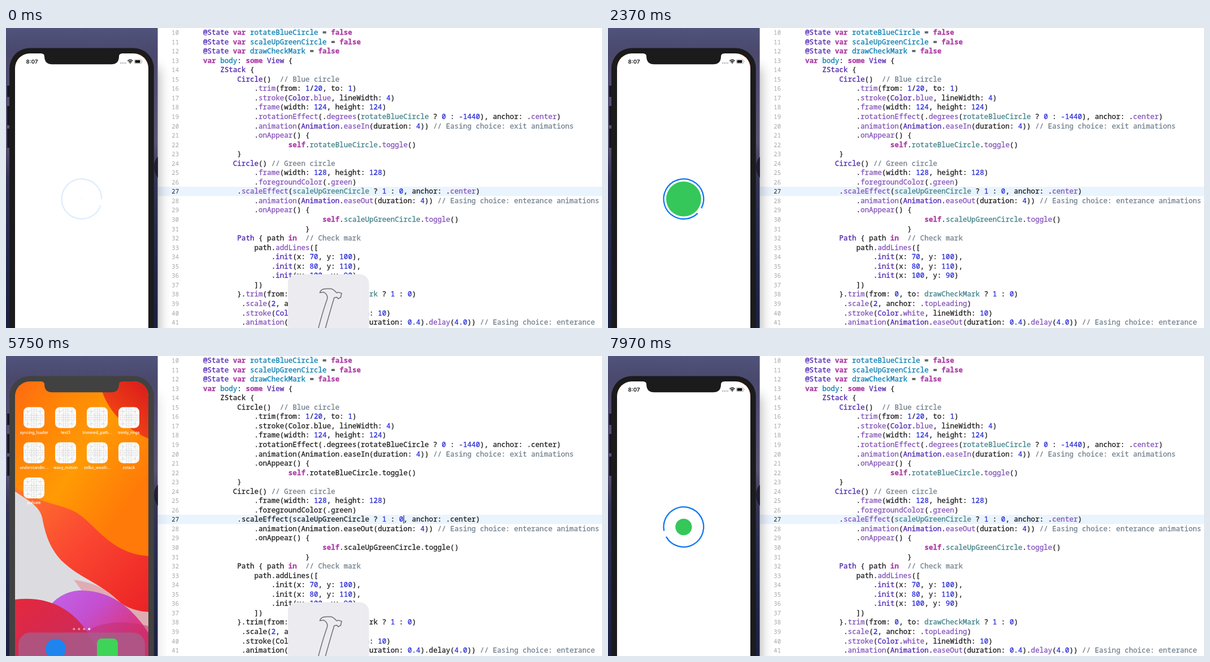
An HTML page for the animation above (8 s loop, 1055 by 531 pixels).

```html
<!DOCTYPE html>
<html lang="en">
<head>
<meta charset="utf-8">
<title>Check mark loader</title>
<style>
html, body { margin: 0; width: 100%; height: 100%; overflow: hidden; background: #fff; }
svg { display: block; width: 1055px; height: 531px; }
text { white-space: pre; }
#code { font: 500 12.57px "Noto Sans Mono", "DejaVu Sans Mono", monospace; color: #1c1c1e; }
#code text, #code tspan { fill: currentColor; stroke: currentColor; stroke-width: .28px; }
#nums { font: 400 10.6px "Noto Sans Mono", "DejaVu Sans Mono", monospace; fill: #a6a6a6; text-anchor: end; }
#nums .now { fill: #1c1c1e; font-weight: 500; }
.key { color: #ad3da4; font-weight: 600; }
.num { color: #272ad8; }
.note { color: #707f8c; }
.decl { color: #047cb0; }
.kind, .type { color: #4b21b0; }
.use { color: #3e8087; }
.call { color: #804fb8; }
.plain .type, .plain .use, .plain .call { color: #1c1c1e; }
#labels { font: 500 6.9px Inter, "Open Sans", sans-serif; fill: #fff; text-anchor: middle; }
#clock { font: 600 9.6px Inter, "Open Sans", sans-serif; fill: #111; }
</style>
</head>
<body>
<svg viewBox="0 0 1055 531" xmlns="http://www.w3.org/2000/svg">
  <defs>
    <linearGradient id="dusk" x1="0" y1="0" x2="0" y2="1">
      <stop offset="0" stop-color="#50537b"/><stop offset=".08" stop-color="#4a486c"/>
      <stop offset=".2" stop-color="#514c70"/><stop offset=".38" stop-color="#5a5374"/>
      <stop offset=".5" stop-color="#343456"/><stop offset=".75" stop-color="#23294d"/>
      <stop offset="1" stop-color="#1b2040"/>
    </linearGradient>
    <linearGradient id="sky" x1="0" y1="0" x2=".7" y2="1">
      <stop stop-color="#ff6a12"/><stop offset=".22" stop-color="#ff8606"/>
      <stop offset=".42" stop-color="#ff9a04"/><stop offset=".7" stop-color="#ff7a08"/>
    </linearGradient>
    <linearGradient id="red" x1="0" y1="0" x2=".8" y2="1"><stop stop-color="#ff7a2c"/><stop offset=".4" stop-color="#fb4a32"/><stop offset="1" stop-color="#ea1d24"/></linearGradient>
    <linearGradient id="corner" x1=".2" y1="1" x2="1" y2="0"><stop stop-color="#fa5212"/><stop offset="1" stop-color="#d81a1c"/></linearGradient>
    <linearGradient id="plum" x1="0" y1="0" x2="1" y2=".6"><stop stop-color="#c06af0"/><stop offset=".5" stop-color="#c44fd0"/><stop offset="1" stop-color="#e0306a"/></linearGradient>
    <linearGradient id="rose" x1="0" y1="0" x2="1" y2="1"><stop stop-color="#e5283c"/><stop offset="1" stop-color="#c42a66"/></linearGradient>
    <filter id="soft" x="-30%" y="-30%" width="160%" height="160%"><feGaussianBlur stdDeviation="11"/></filter>
    <clipPath id="page"><rect x="268.6" width="786.4" height="531"/></clipPath>
    <clipPath id="glass"><rect x="16" y="45" width="236" height="540" rx="26"/></clipPath>
    <g id="tile">
      <rect x="-18.5" y="-18.5" width="37" height="37" rx="8.5" fill="#fff"/>
      <g fill="none" stroke="#cfcfd2" stroke-width=".55">
        <path d="M-18 -11H18M-18 -4H18M-18 4H18M-18 11H18M-11 -18V18M-4 -18V18M4 -18V18M11 -18V18M-16 -16L16 16M16 -16L-16 16M0 -18V18M-18 0H18"/>
        <circle r="5"/><circle r="8"/><circle r="15"/>
      </g>
    </g>
  </defs>

  <rect width="1055" height="531" fill="#fff"/>
  <rect x="269" y="281" width="786" height="16.4" fill="#eaf4fe"/>
  <g clip-path="url(#page)">
    <rect id="shade" x="6" y="70" width="264" height="560" fill="#000" filter="url(#soft)"/>
  </g>
  <g id="nums"></g>
  <g id="code"></g>
  <rect id="caret" x="703.6" y="282" width="1.1" height="14.5" fill="#1c1c1e"/>

  <rect width="268.6" height="531" fill="url(#dusk)"/>
  <path d="M269 228Q262 234 262 246T269 265Z" fill="#1b1928" opacity=".85"/>
  <path d="M2 102h5v20h-5zM2 138h5v34h-5zM2 178h5v34h-5z" fill="#17171c"/>

  <rect class="bezel" x="6" y="35.5" width="255.8" height="560" rx="36"/>
  <g clip-path="url(#glass)">
    <g id="home">
      <rect x="16" y="45" width="236" height="490" fill="url(#sky)"/>
      <path d="M166 45C172 86 204 126 252 146V45Z" fill="url(#corner)"/>
      <path d="M16 232C60 262 100 262 126 278C160 300 186 350 252 354V531H16Z" fill="url(#red)"/>
      <path d="M16 240C44 258 60 268 64 286C70 318 78 340 98 362C134 396 166 400 204 438C220 448 236 452 252 453V531H16Z" fill="#dcdce0"/>
      <path d="M50 531C52 450 92 415 134 415C190 415 228 452 252 490V531Z" fill="url(#plum)"/>
      <path d="M120 396C160 402 176 412 204 438C220 448 236 452 252 453V490C228 452 190 415 134 415Z" fill="#e91f30" opacity=".25"/>
      <path d="M16 431C76 424 132 446 166 531H16Z" fill="url(#rose)"/>
      <path d="M100 531C130 480 180 460 252 478V531Z" fill="#c32c6c" opacity=".5"/>
      <rect x="22" y="489.5" width="224" height="70" rx="21" fill="#a5608c" opacity=".75"/>
      <circle cx="88" cy="518.5" r="18" fill="#1e84ee"/>
      <rect x="161" y="500" width="37" height="37" rx="8.5" fill="#3ed457"/>
      <g id="dots" fill="#fff"></g>
      <g id="tiles"></g>
      <g id="labels"></g>
    </g>
    <g id="app">
      <rect id="sheet" fill="#fff"/>
      <g id="status">
        <text id="clock" x="35.6" y="62.8">8:07</text>
        <path d="M202 62h2m1 0h2m1 0h2m1 0h2" stroke="#9a9a9a" stroke-width="1.7"/>
        <path d="M215.3 58.2Q219.9 54.2 224.5 58.2M217 60.2Q219.9 57.6 222.8 60.2" fill="none" stroke="#111" stroke-width="1.5"/>
        <path d="M218.2 61.2Q219.9 59.9 221.6 61.2L219.9 63Z" fill="#111"/>
        <rect x="227.4" y="56" width="12.6" height="6.8" rx="1.9" fill="none" stroke="#888" stroke-width=".7"/>
        <rect x="228.5" y="57.1" width="9" height="4.6" rx="1" fill="#111"/>
        <path d="M241 58.2q1.2 1.2 0 2.4z" fill="#888"/>
      </g>
      <g id="loader" transform="translate(133.9 302.6)">
        <circle id="ring" r="35.4" pathLength="100" fill="none" stroke="#0f75f5" stroke-width="2.3" stroke-dasharray="0 5 95"/>
        <circle id="disc" fill="#35c759"/>
        <path id="tick" d="M-19.2 1.4L-7.8 12.8L15 -10" pathLength="100" fill="none" stroke="#fff" stroke-width="5.7"/>
      </g>
    </g>
  </g>
  <path class="bezel" d="M62 43H206V45Q200 45.5 200 50Q200 64.3 186 64.3H82Q68 64.3 68 50Q68 45.5 62 45Z"/>

  <g id="hud">
    <rect x="499" y="436" width="143.5" height="130" rx="16" fill="#ebebf0"/>
    <path d="M552 535C558 512 563 495 568.5 480C570 474 567 470 562 467.4L555.5 468.4C557 463.5 562 461.6 567 461.6H575C580 462.2 582 466 586 469L588 467.6L594 469.5L592.6 476.5L588 479.3L585.8 476.4L581 477.3C576 494 570 514 564.5 535" fill="none" stroke="#707073" stroke-width="1.5" stroke-linejoin="round"/>
  </g>
</svg>
<script>
const LOOP = 8000;
const $ = id => document.getElementById(id);
const clamp = v => Math.min(1, Math.max(0, v));
const ramp = (t, a, b) => clamp((t - a) / (b - a));
const set = (id, attrs) => {
  for (const k in attrs) $(id).setAttribute(k, attrs[k]);
};

// Code listing: each entry is [indent, text], numbered from 10.
const lines = [
  [0, '@State var rotateBlueCircle = false'],
  [0, '@State var scaleUpGreenCircle = false'],
  [0, '@State var drawCheckMark = false'],
  [0, 'var body: some View {'],
  [4, 'ZStack {'],
  [8, 'Circle()  // Blue circle'],
  [12, '.trim(from: 1/20, to: 1)'],
  [12, '.stroke(Color.blue, lineWidth: 4)'],
  [12, '.frame(width: 124, height: 124)'],
  [12, '.rotationEffect(.degrees(rotateBlueCircle ? 0 : -1440), anchor: .center)'],
  [12, '.animation(Animation.easeIn(duration: 4)) // Easing choice: exit animations'],
  [12, '.onAppear() {'],
  [20, 'self.rotateBlueCircle.toggle()'],
  [8, '}'],
  [7, 'Circle() // Green circle'],
  [12, '.frame(width: 128, height: 128)'],
  [12, '.foregroundColor(.green)'],
  [8, '.scaleEffect(scaleUpGreenCircle ? 1 : 0, anchor: .center)'],
  [12, '.animation(Animation.easeOut(duration: 4)) // Easing choice: enterance animations'],
  [12, '.onAppear() {'],
  [28, 'self.scaleUpGreenCircle.toggle()'],
  [24, '}'],
  [8, 'Path { path in  // Check mark'],
  [12, 'path.addLines(['],
  [16, '.init(x: 70, y: 100),'],
  [16, '.init(x: 80, y: 110),'],
  [16, '.init(x: 100, y: 90)'],
  [12, '])'],
  [8, '}.trim(from: 0, to: drawCheckMark ? 1 : 0)'],
  [9, '.scale(2, anchor: .topLeading)'],
  [9, '.stroke(Color.white, lineWidth: 10)'],
  [9, '.animation(Animation.easeOut(duration: 0.4).delay(4.0)) // Easing choice: enterance'],
];
const rules = [
  ['note', '\\/\\/.*'],
  ['key', '\\b(?:var|some|in|false|self)\\b'],
  ['kind', '@State|\\bView\\b'],
  ['decl', '(?<=var )\\w+'],
  ['type', '\\b(?:ZStack|Circle|Path|Color|Animation|init)\\b'],
  ['use', '\\b(?:rotateBlueCircle|scaleUpGreenCircle|drawCheckMark)\\b'],
  ['call', '(?<=\\.)[a-z]\\w*'],
  ['num', '-?\\b\\d+(?:\\.\\d+)?'],
];
const lexer = new RegExp(rules.map(r => `(${r[1]})`).join('|'), 'g');
const paint = s => s.replace(lexer, (m, ...g) =>
  `<tspan class="${rules[g.findIndex((v, i) => i < rules.length && v !== undefined)][0]}">${m}</tspan>`);

let code = '', nums = '';
lines.forEach(([indent, text], i) => {
  const y = (12 + 16.55 * i).toFixed(2);
  code += `<text x="${349 + indent * 7.542}" y="${y}">${paint(text)}</text>`;
  nums += `<text x="306" y="${y}"${i === 17 ? ' class="now"' : ''}>${i + 10}</text>`;
});
$('code').innerHTML = code;
$('nums').innerHTML = nums;

const apps = ['syncing_loader', 'test3', 'trimmed_path...', 'trinity_rings', 'understandin...',
  'wavy_motion', 'zelbo_weath...', 'zstack', 'pulsate'];
let tiles = '', labels = '';
apps.forEach((name, i) => {
  const x = 49.5 + 56 * (i % 4), y = 109 + 62.2 * Math.floor(i / 4);
  tiles += `<use href="#tile" x="${x}" y="${y}"/>`;
  labels += `<text x="${x}" y="${y + 28.6}">${name}</text>`;
});
$('tiles').innerHTML = tiles;
$('labels').innerHTML = labels;
$('dots').innerHTML = [0, 1, 2, 3].map(i =>
  `<circle cx="${120.3 + 9 * i}" cy="483.2" r="2" opacity="${i === 3 ? 1 : .5}"/>`).join('');

// Cubic easing whose end handles sit at x1 and x2, with y handles 0 and 1.
function ease(x, x1, x2) {
  let lo = 0, hi = 1;
  for (let i = 0; i < 24; i++) {
    const s = (lo + hi) / 2, r = 1 - s;
    if (3 * r * r * s * x1 + 3 * r * s * s * x2 + s * s * s < x) lo = s; else hi = s;
  }
  return lo * lo * (3 - 2 * lo);
}
const easeIn = x => ease(clamp(x), .42, 1);
const easeOut = x => ease(clamp(x), 0, .58);

function drawLoader(ms) {
  const tick = 100 * easeOut((ms - 4000) / 400);
  set('loader', { opacity: ramp(ms, 30, 230) });
  set('ring', { transform: `rotate(${-1440 * (1 - easeIn(ms / 4000))})` });
  set('disc', { r: 36.5 * easeOut(ms / 4000) });
  set('tick', { 'stroke-dasharray': `${tick} 200`, visibility: tick > .1 ? 'inherit' : 'hidden' });
}

// The app fades away, then grows again out of its icon.
const OPEN = 6150;
function drawApp(t) {
  const grow = t < OPEN ? 1 : easeOut(ramp(t, OPEN, 6650));
  const mix = (a, b) => a + (b - a) * grow;
  set('sheet', { x: mix(31, 16), y: mix(215, 45), width: mix(37, 236), height: mix(37, 511), rx: mix(8.5, 26) });
  set('status', { opacity: ramp(grow, .8, 1) });
  set('app', { opacity: t < OPEN ? 1 - ramp(t, 5630, 5740) : ramp(t, OPEN, OPEN + 150) });
}

function hudAlpha(t) {
  if (t < 5200) return 1 - ramp(t, 300, 830);
  return ramp(t, 5200, 5290) * (1 - ramp(t, 7360, 7860));
}

const bezels = document.querySelectorAll('.bezel');
function draw(t) {
  const idle = t >= 5230 && t < 6840;
  bezels.forEach(b => b.setAttribute('fill', idle ? '#414141' : '#1b1b1c'));
  set('shade', { opacity: idle ? .12 : .32 });
  set('code', { class: t >= 5650 && t < 6480 ? 'plain' : '' });
  set('caret', { visibility: t >= 5230 && t < 6300 ? 'visible' : 'hidden' });
  set('hud', { opacity: hudAlpha(t) });
  drawApp(t);
  // The loader runs at 10/9 of wall speed.
  drawLoader((t - (t < OPEN ? -50 : 7012)) * 10 / 9);
}

const start = performance.now();
function frame() {
  draw((performance.now() - start) % LOOP);
  requestAnimationFrame(frame);
}
frame();
</script>
</body>
</html>
```
